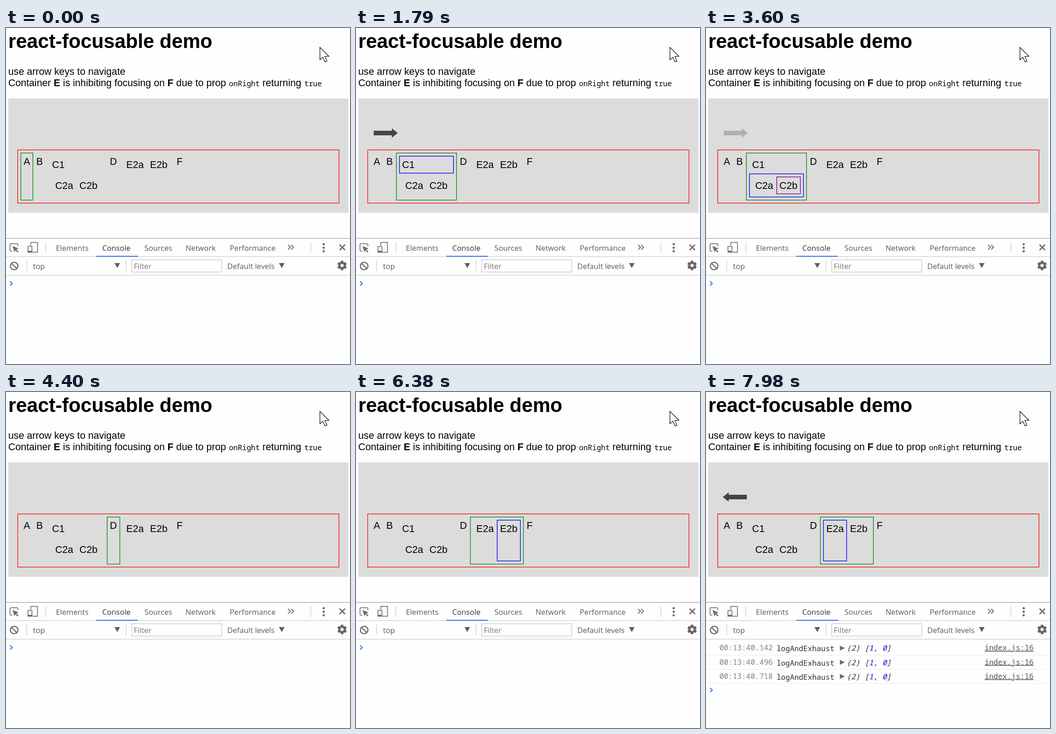
Write an HTML page with a canvas that moves like this. It is 758x739 px and loops after 8000 ms.

```html
<!DOCTYPE html>
<html lang="en">
<head>
<meta charset="utf-8">
<title>react-focusable demo</title>
<style>
html, body { margin: 0; width: 758px; height: 739px; overflow: hidden; background: #fefefe; }
canvas, svg { position: absolute; left: 0; top: 0; display: block; }
text { white-space: pre; }
.h { font: bold 43.5px "Liberation Sans", Arial, sans-serif; }
.p { font: 21.7px "Liberation Sans", Arial, sans-serif; }
.b { font-weight: bold; }
.code { font: 16.2px "Noto Sans Mono", monospace; }
.ui { font: 16.7px "Open Sans", "Noto Sans", sans-serif; fill: #5a5a5a; }
.on { fill: #333; }
.hint { fill: #757575; }
.log { font: 16.35px "Noto Sans Mono", monospace; fill: #303030; }
.time { fill: #808080; }
.link { fill: #545454; text-decoration: underline; }
.arr { font-style: italic; }
.num { fill: #1c00cf; }
</style>
</head>
<body>
<canvas id="c" width="758" height="739"></canvas>
<svg id="s" width="758" height="739" xmlns="http://www.w3.org/2000/svg"></svg>
<script>
const LOOP = 8000, ROW = 31.2;
const ctx = document.getElementById('c').getContext('2d');
const svg = document.getElementById('s');

function make(name, attrs, parent) {
  const el = document.createElementNS('http://www.w3.org/2000/svg', name);
  for (const k in attrs) el.setAttribute(k, attrs[k]);
  parent.appendChild(el);
  return el;
}
function label(str, x, y, cls, parent = svg) {
  const el = make('text', { x, y, class: cls }, parent);
  el.textContent = str;
  return el;
}
function span(el, str, cls = '') {
  make('tspan', { class: cls }, el).textContent = str;
}

// Static text
label('react-focusable demo', 5, 44, 'h');
label('use arrow keys to navigate', 5, 103, 'p');
const info = label('', 5, 128, 'p');
span(info, 'Container ');
span(info, 'E', 'b');
span(info, ' is inhibiting focusing on ');
span(info, 'F', 'b');
span(info, ' due to prop ');
label('onRight', 491.3, 128, 'code');
label('returning', 565, 128, 'p');
label('true', 657.2, 128, 'code');

[['A', 38.8, 301], ['B', 66.7, 301], ['C1', 101.5, 308], ['C2a', 108.4, 353.6],
 ['C2b', 161.8, 353.6], ['D', 228.8, 301], ['E2a', 265, 308], ['E2b', 317.2, 308],
 ['F', 376, 301]].forEach(([s, x, y]) => label(s, x, y, 'p'));

[['Elements', 110], ['Console', 212, 'on'], ['Sources', 305], ['Network', 395.5],
 ['Performance', 493]].forEach(([s, x, c = '']) => label(s, x, 490, 'ui ' + c));
label('top', 59.5, 530, 'ui');
label('Filter', 281.5, 530, 'ui hint');
label('Default levels', 487.5, 530, 'ui');

// Console rows, shown as they are logged
const rows = ['142', '496', '718'].map((ms, i) => {
  const g = make('g', {}, svg), y = 568.3 + i * ROW;
  label('00:13:40.' + ms, 29.5, y, 'log time', g);
  label('logAndExhaust', 155.5, y + 2, 'log', g);
  const arr = label('', 310, y + 1, 'log arr', g);
  span(arr, '(2) [');
  span(arr, '1', 'num');
  span(arr, ', ');
  span(arr, '0', 'num');
  span(arr, ']');
  label('index.js:16', 614, y, 'log link', g);
  return g;
});

// Focus outlines: x, y, right, bottom, colour
const GREEN = '#008a0e', BLUE = '#0000f4', PURPLE = '#800080';
const BOX = {
  A: [32, 274.3, 60, 379.2, GREEN],
  B: [60, 274.3, 88.3, 379.2, GREEN],
  C: [88.3, 274.3, 222.2, 379.2, GREEN],
  C1: [95.1, 281.1, 215.4, 320, BLUE],
  C2: [95.1, 320, 215.4, 372.3, BLUE],
  C2a: [101.8, 326.8, 155, 365.5, PURPLE],
  C2b: [155.2, 326.8, 208.7, 365.5, PURPLE],
  D: [222.2, 274.3, 251.5, 379.2, GREEN],
  E: [251.3, 274.3, 369.5, 379.2, GREEN],
  E2a: [258.1, 281.1, 310.5, 372.3, BLUE],
  E2b: [310.5, 281.1, 363, 372.3, BLUE]
};

// Key presses: start, direction, focus path, log count, then fade steps [time, opacity]
const KEYS = [
  [0, '', 'A', 0],
  [600, 'right', 'B', 0, [800, .65], [1000, .29], [1200, 0]],
  [1620, 'right', 'C C1', 0, [1810, .45], [1990, 0]],
  [2610, 'down', 'C C2 C2a', 0, [2820, .65], [3010, .29]],
  [3200, 'right', 'C C2 C2b', 0, [3400, .65], [3600, .29]],
  [3800, 'right', 'D', 0, [4000, .65], [4200, .29], [4400, 0]],
  [5020, 'right', 'E E2a', 0, [5210, .45], [5400, 0]],
  [5790, 'right', 'E E2b', 0, [5990, .65], [6190, .29], [6380, 0]],
  [6780, 'right', 'E E2b', 1, [6980, .6]],
  [7180, 'right', 'E E2b', 2],
  [7380, 'right', 'E E2b', 3, [7570, .6], [7770, .2]],
  [7980, 'left', 'E E2a', 3]
];

function fill(color, x, y, w, h) {
  ctx.fillStyle = color;
  ctx.fillRect(x, y, w, h);
}
function path(pts, close) {
  ctx.beginPath();
  for (let i = 0; i < pts.length; i += 2) ctx.lineTo(pts[i], pts[i + 1]);
  if (close) ctx.closePath();
}
function poly(color, ...pts) {
  path(pts, true);
  ctx.fillStyle = color;
  ctx.fill();
}
function line(color, width, ...pts) {
  path(pts);
  ctx.strokeStyle = color;
  ctx.lineWidth = width;
  ctx.stroke();
}
function frame(color, width, x, y, w, h) {
  ctx.strokeStyle = color;
  ctx.lineWidth = width;
  ctx.strokeRect(x, y, w, h);
}
function disc(color, x, y, r) {
  ctx.beginPath();
  ctx.arc(x, y, r, 0, 7);
  ctx.fillStyle = color;
  ctx.fill();
}
function outline([x, y, r, b, color]) {
  frame(color, 1.4, x + .7, y + .7, r - x - 1.4, b - y - 1.4);
}

function arrow(dir, alpha) {
  if (!dir || !alpha) return;
  const [x, y, turn] = { right: [92, 231, 0], left: [37, 231, Math.PI], down: [49.7, 253, Math.PI / 2] }[dir];
  const len = dir === 'down' ? 47 : 53;
  ctx.save();
  ctx.translate(x, y);
  ctx.rotate(turn);
  ctx.globalAlpha = alpha;
  poly('#444', 0, 0, -13, -10.3, -13, -5, -len, -5, -len, 5, -13, 5, -13, 10.3);
  ctx.restore();
}

function cursor() {
  const pts = [691.7, 42.5, 691.7, 70, 698, 64.3, 703, 74.7, 707.3, 72.8, 702.6, 62.7, 711.5, 62.2];
  poly('#fff', ...pts);
  path(pts, true);
  ctx.strokeStyle = '#111';
  ctx.lineWidth = 1.3;
  ctx.stroke();
}

function gear(x, y) {
  ctx.save();
  ctx.translate(x, y);
  for (let i = 0; i < 6; i++) {
    ctx.rotate(Math.PI / 3);
    poly('#666', -3.6, -6, -2.4, -10.5, 2.4, -10.5, 3.6, -6);
  }
  ctx.restore();
  disc('#666', x, y, 8);
  disc('#fefefe', x, y, 3.5);
}

function tools() {
  const ink = '#6e6e6e', rule = '#ccc';
  fill('#a6a6a6', 0, 462, 758, 1.4);
  fill(rule, 0, 502, 758, 1.3);
  fill(rule, 0, 543, 758, 1.3);
  fill('#3b7de9', 199, 501, 92, 2.2);
  [[87, 471], [671, 471], [45, 511], [264, 511]].forEach(([x, y]) => fill(rule, x, y, 1.3, 24));

  // inspect
  line(ink, 1.7, 14, 491, 10.5, 491, 8.8, 489.3, 8.8, 476, 10.5, 474.3, 24.5, 474.3, 26.2, 476, 26.2, 480);
  poly(ink, 14.2, 479.5, 27.8, 484.8, 22.8, 487, 27.5, 491.7, 25.5, 493.7, 20.8, 489, 18.8, 493.5);
  // device
  frame(ink, 1.7, 54.6, 471.6, 14.8, 21.6);
  fill('#fefefe', 47, 478.6, 11.5, 16);
  frame(ink, 1.7, 48.4, 480.4, 8.8, 12.8);
  fill(ink, 48, 490, 10, 3.5);
  // more, menu, close
  line(ink, 2, 621.5, 477, 626.8, 482.3, 621.5, 487.6);
  line(ink, 2, 628.3, 477, 633.6, 482.3, 628.3, 487.6);
  [475.5, 483.3, 491].forEach(y => disc(ink, 700, y, 2.5));
  line(ink, 2.8, 735, 476.5, 747, 488.5);
  line(ink, 2.8, 747, 476.5, 735, 488.5);
  // clear
  ctx.beginPath();
  ctx.arc(18, 523.5, 8.3, 0, 7);
  ctx.lineWidth = 2.6;
  ctx.strokeStyle = ink;
  ctx.stroke();
  line(ink, 2.6, 12.3, 517.8, 23.7, 529.2);
  poly('#5f5f5f', 239, 517, 251.3, 517, 245.2, 528);
  poly('#5f5f5f', 601.5, 517, 613.8, 517, 607.7, 528);
  frame('#c6c6c6', 1.3, 276.9, 509.7, 198.5, 27);
  gear(740.5, 522.3);
}

function draw(t) {
  const key = KEYS.filter(k => k[0] <= t).pop();
  const [, dir, focus, logs, ...fade] = key;
  const step = fade.filter(f => f[0] <= t).pop();

  fill('#fefefe', 0, 0, 758, 739);
  fill('#dcdcdc', 5, 155, 749.5, 251.5);
  outline([25, 267.5, 734.3, 385.8, '#fa0f0f']);
  focus.split(' ').forEach(id => outline(BOX[id]));
  arrow(dir, step ? step[1] : 1);
  cursor();
  tools();

  rows.forEach((g, i) => {
    const shown = i < logs, y = 562.5 + i * ROW;
    g.setAttribute('visibility', shown ? 'visible' : 'hidden');
    if (!shown) return;
    poly('#6e6e6e', 295, y - 4.8, 306, y + .7, 295, y + 6.2);
    fill('#eee', 0, y + 15.5, 758, 1.3);
  });
  const y = 562 + logs * ROW;
  line('#3b7de9', 2.2, 9, y - 4.6, 13.8, y, 9, y + 4.6);
}

const start = performance.now();
function tick() {
  draw((performance.now() - start) % LOOP);
  requestAnimationFrame(tick);
}
tick();
</script>
</body>
</html>
```
